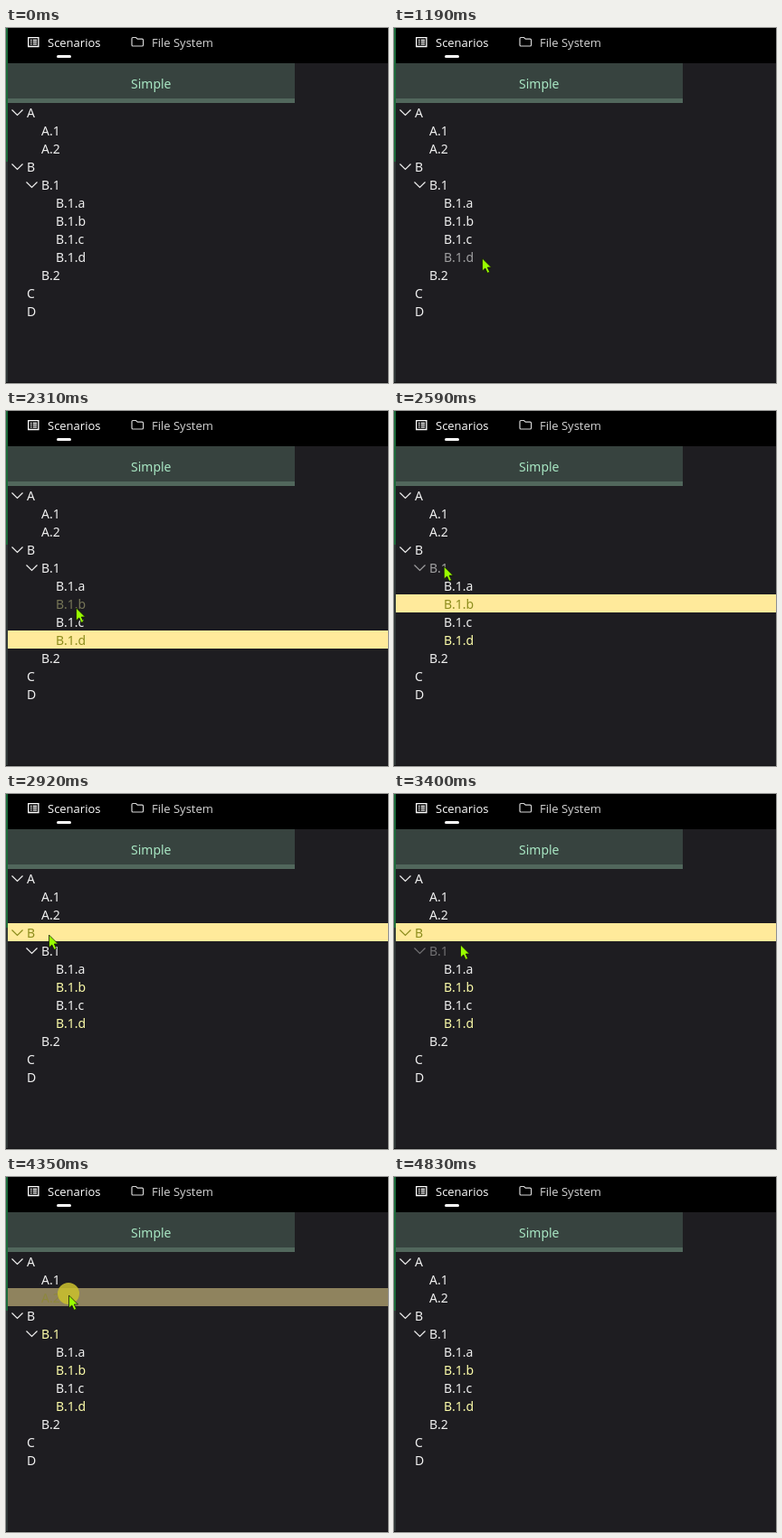
An HTML page with a canvas that plays this animation: 422 by 393 pixels, repeating every 5.23 s.

```html
<!DOCTYPE html>
<html lang="en">
<head>
<meta charset="utf-8">
<title>Tree selection</title>
<style>
  html, body { margin: 0; width: 100%; height: 100%; overflow: hidden; background: #1e1d21; }
  canvas { display: block; }
</style>
</head>
<body>
<canvas id="stage" width="422" height="393"></canvas>
<script>
const ctx = document.getElementById('stage').getContext('2d');
const LOOP = 5230, STEP = 68.5, ROW_TOP = 83, ROW_HEIGHT = 20;
const LABELS = ['A', 'A.1', 'A.2', 'B', 'B.1', 'B.1.a', 'B.1.b', 'B.1.c', 'B.1.d', 'B.2', 'C', 'D'];
const PARENTS = ['A', 'B', 'B.1'];

// Pointer moves: first step time, number of steps, destination
const START = [307, 394];
const MOVES = [
  [710, 8, 97, 254],
  [1770, 6, 77, 217],
  [2380, 6, 47, 155],
  [2990, 2, 73, 166],
  [3530, 4, 69, 130],
  [4490, 6, 286, 379],
];

// Press time and label; pressing the selected row clears it
const CLICKS = [
  [1380, 'B.1.d'], [2240, 'B.1.b'], [2790, 'B'],
  [3330, 'B.1'], [3815, 'A.2'], [4350, 'A.2'],
];
const RING_TIME = 65, PRESS_TIME = 130;

// Rows that keep a yellow label: label, from, to
const TINTS = [['B.1.b', 2300, LOOP], ['B.1.d', 2370, LOOP], ['B.1', 3945, 4480]];

function pointerAt(t) {
  if (t < 710 || t >= 4830) return null;
  let [x, y] = START;
  for (const [start, steps, toX, toY] of MOVES) {
    if (t < start) break;
    const p = Math.min(1, (Math.floor((t - start) / STEP) + 1) / steps);
    const ease = p * p * (3 - 2 * p);
    x += (toX - x) * ease;
    y += (toY - y) * ease;
  }
  return { x, y };
}

function selectionAt(t) {
  let selected = null;
  for (const [time, label] of CLICKS)
    if (t >= time + PRESS_TIME) selected = selected === label ? null : label;
  return selected;
}

function rect(x, y, w, h, color) {
  ctx.fillStyle = color;
  ctx.fillRect(x, y, w, h);
}

function text(str, x, y, color, font = '14px "Noto Sans", sans-serif') {
  ctx.font = font;
  ctx.fillStyle = color;
  ctx.fillText(str, x, y);
}

function stroke(path, color, width = 1.2) {
  ctx.strokeStyle = color;
  ctx.lineWidth = width;
  ctx.stroke(new Path2D(path));
}

function drawHeader() {
  const font = '13px "Open Sans", sans-serif';
  rect(0, 0, 422, 39, '#000');
  stroke('M24.7 10.7h11.2v9.8h-11.2zM27 13.5h1.5m1.2 0h4.5M27 15.7h1.5m1.2 0h4.5M27 17.9h1.5m1.2 0h4.5', '#fff', 1.3);
  text('Scenarios', 46, 21, '#fff', font);
  stroke('M139 11.8q0-1.3 1.3-1.3h3.2l1.8 1.7h5q1.3 0 1.3 1.3v5.2q0 1.3-1.3 1.3h-10q-1.3 0-1.3-1.3z', '#d6d6d6');
  text('File System', 161, 21, '#d6d6d6', font);
  ctx.fillStyle = '#fff';
  ctx.beginPath();
  ctx.roundRect(56, 30, 16, 3, 1.5);
  ctx.fill();
  rect(2, 39, 317, 39, '#37433f');
  rect(2, 78, 317, 5, '#51675c');
  text('Simple', 138, 67, '#a8e6c3');
}

function drawRow(label, i, { selected, pressed, hovered, tinted }) {
  const x = 23 + 16 * (label.split('.').length - 1);
  const y = ROW_TOP + ROW_HEIGHT * i;
  const color = selected ? '#8c8c1c' : '#f0f0f0';
  ctx.globalAlpha = pressed ? (selected ? 0.5 : 0.4) : hovered && !selected ? 0.62 : 1;
  if (selected) rect(2, y, 420, ROW_HEIGHT, '#ffea9b');
  if (PARENTS.includes(label)) stroke(`M${x - 16.5} ${y + 7.5}l6 6l6-6`, color);
  text(label, x, y + 16, tinted && !selected ? '#fdfdaa' : color);
  ctx.globalAlpha = 1;
}

function drawPointer({ x, y }, ring) {
  if (ring) {
    ctx.fillStyle = 'rgba(200,190,45,.88)';
    ctx.beginPath();
    ctx.arc(x, y - 1, 12, 0, 2 * Math.PI);
    ctx.fill();
  }
  const arrow = new Path2D('M.5 1v14l3.3-3l2.4 5.3l2.5-1.1l-2.4-5.2h4.2z');
  ctx.save();
  ctx.translate(x, y);
  ctx.fillStyle = '#9f0';
  ctx.fill(arrow);
  ctx.strokeStyle = '#161a08';
  ctx.lineWidth = 0.8;
  ctx.stroke(arrow);
  ctx.restore();
}

function draw(t) {
  const pointer = pointerAt(t);
  const selected = selectionAt(t);
  const click = CLICKS.find(([time]) => t >= time && t < time + PRESS_TIME);
  const hoverRow = pointer ? Math.floor((pointer.y - ROW_TOP) / ROW_HEIGHT) : -1;

  rect(0, 0, 422, 393, '#1e1d21');
  drawHeader();
  LABELS.forEach((label, i) => drawRow(label, i, {
    selected: label === selected,
    pressed: click && click[1] === label,
    hovered: i === hoverRow,
    tinted: TINTS.some(([name, from, to]) => name === label && t >= from && t < to),
  }));
  rect(0, 0, 2, 148, '#1b6b3a');
  rect(0, 148, 2, 245, '#2f3737');
  rect(0, 392, 422, 1, '#141416');
  if (pointer) drawPointer(pointer, click && t < click[0] + RING_TIME);
}

const begin = performance.now();
function tick() {
  draw((performance.now() - begin) % LOOP);
  requestAnimationFrame(tick);
}
tick();
</script>
</body>
</html>
```
